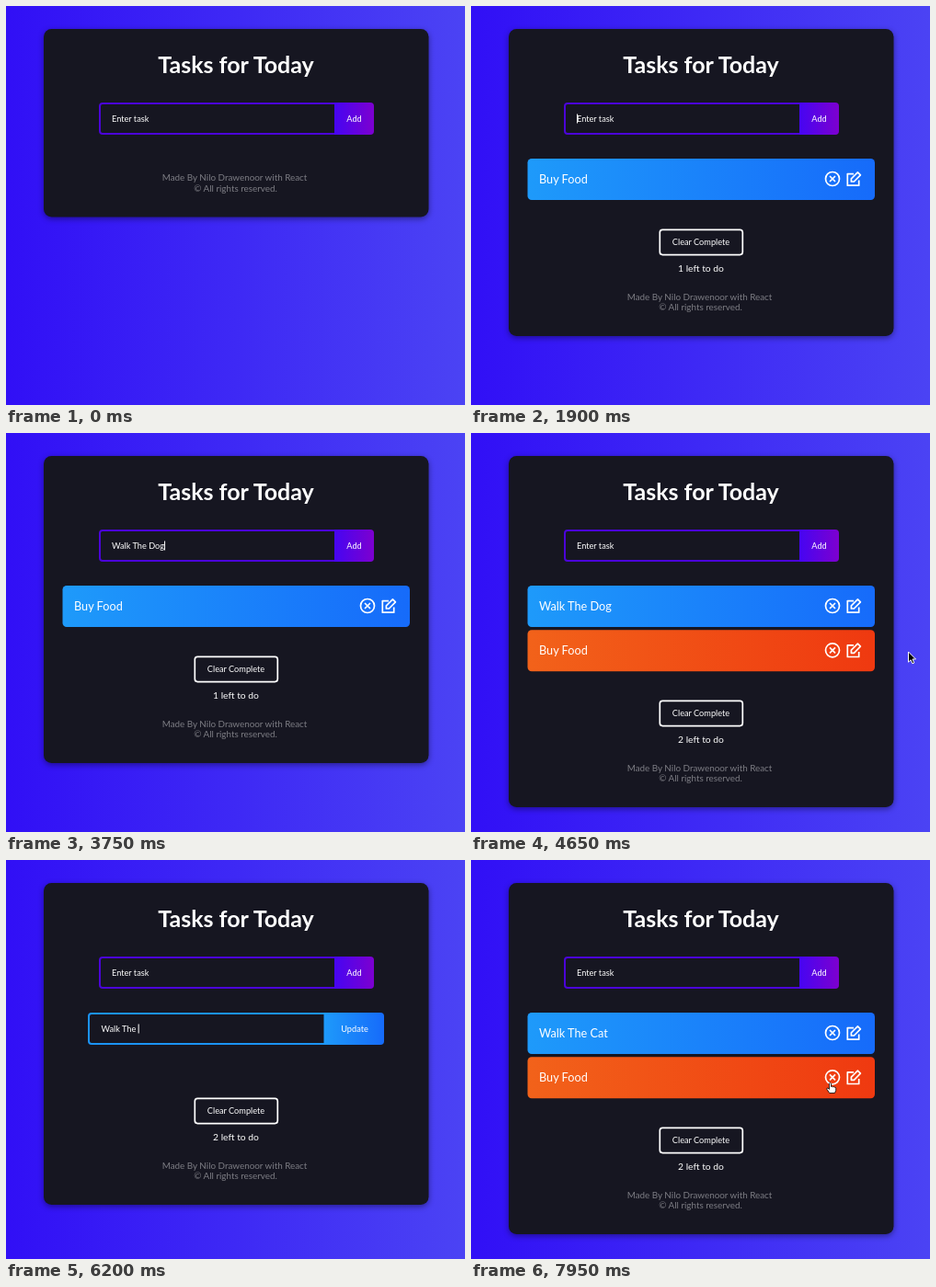
These frames come from a looping animation (499 by 434 pixels, 8 s). An HTML page:

```html
<!DOCTYPE html>
<html lang="en">
<head>
<meta charset="utf-8">
<title>Tasks for Today</title>
<style>
  html, body { margin: 0; width: 100%; height: 100%; overflow: hidden; background: #3a22f5; }
  svg { display: block; width: 100%; height: 100%; }
  text { font: 9.2px Lato, "Open Sans", sans-serif; fill: #fff; white-space: pre; }
  .mid { text-anchor: middle; }
  .title { font-size: 25px; font-weight: 700; }
  .task { font-size: 12.7px; }
  .left { font-size: 10.3px; }
  .foot { font-size: 9.85px; fill: #7d7d84; }
  .card { fill: #161621; filter: drop-shadow(0 2px 3px rgba(0, 0, 0, .42)); }
  .line { fill: none; stroke: #fff; stroke-width: 1.7; stroke-linejoin: round; }
  .caret { fill: #fff; }
</style>
</head>
<body>
<svg viewBox="0 0 499 434">
  <defs>
    <linearGradient id="page"><stop stop-color="#310ff6"/><stop offset="1" stop-color="#4b43f4"/></linearGradient>
    <linearGradient id="violet"><stop stop-color="#4605f2"/><stop offset="1" stop-color="#7d00cf"/></linearGradient>
    <linearGradient id="blue"><stop stop-color="#1e9afa"/><stop offset="1" stop-color="#166bfa"/></linearGradient>
    <linearGradient id="orange"><stop stop-color="#f2621a"/><stop offset="1" stop-color="#ef3910"/></linearGradient>
    <g id="icons" class="line">
      <circle cx="393" cy="22" r="7.5"/>
      <path d="M390 19l6 6m0-6l-6 6"/>
      <path d="M416 16.6h-6.7v12.6h12.4v-5.6M413.4 25v-3.2l7-7 3 3-7 7.2z"/>
    </g>
  </defs>

  <rect width="499" height="434" fill="url(#page)"/>
  <rect id="card" class="card" x="41" y="25" width="418.5" rx="8.5"/>
  <text class="title mid" x="250" y="73.3">Tasks for Today</text>

  <g id="addForm" transform="translate(101 105)">
    <path d="M257 1H4a3 3 0 0 0-3 3v27a3 3 0 0 0 3 3h253" fill="none" stroke="#4b04d9" stroke-width="2"/>
    <path d="M256 0h39a4 4 0 0 1 4 4v27a4 4 0 0 1-4 4h-39z" fill="url(#violet)"/>
    <text class="value" x="14" y="20.6"></text>
    <rect class="caret" y="12.5" width="1" height="10"/>
    <text class="mid" x="277.5" y="20.6">Add</text>
  </g>

  <g id="editForm" transform="translate(89 166)">
    <path d="M257 1H4a3 3 0 0 0-3 3v27a3 3 0 0 0 3 3h253" fill="none" stroke="#1b93f7" stroke-width="2"/>
    <path d="M256.500 0h61.500a4 4 0 0 1 4 4v27a4 4 0 0 1-4 4h-61.500z" fill="url(#blue)"/>
    <text class="value" x="14.500" y="20.6"></text>
    <rect class="caret" y="12.5" width="1" height="10"/>
    <text class="mid" x="290" y="20.6">Update</text>
  </g>

  <g id="row0" transform="translate(0 166)">
    <rect x="61.5" width="377.5" height="45" rx="4.500" fill="url(#blue)"/>
    <text class="task" x="74" y="26.7"></text>
    <use href="#icons"/>
  </g>
  <g id="row1" transform="translate(0 214.3)">
    <rect x="61.5" width="377.5" height="45" rx="4.500" fill="url(#orange)"/>
    <text class="task" x="74" y="26.7">Buy Food</text>
    <use href="#icons"/>
  </g>

  <g id="bottom">
    <g id="summary">
      <rect class="line" x="205.300" y="-115.700" width="90" height="27.300" rx="3"/>
      <text class="mid" x="250" y="-98.900">Clear Complete</text>
      <text id="count" class="left mid" x="250" y="-70.500"></text>
    </g>
    <text class="foot mid" x="248.5" y="-39.2">Made By Nilo Drawenoor with React</text>
    <text class="foot mid" x="249.5" y="-28">© All rights reserved.</text>
  </g>

  <g id="pointer" stroke-linejoin="round">
    <path id="arrow" d="M0 0V11.200L2.600 8.800 4.400 12.800 6.300 12 4.500 8H8z" fill="#000" stroke="#fff"/>
    <path id="hand" d="M-1 1Q0-.6 1 1V4.500Q2 3.700 2.800 4.800 3.900 4 4.600 5.200 6 4.700 6.200 6.200V8.500L5 11.500H-.8L-3.600 7.300Q-4 5.800-2.500 6L-1 7.400z" fill="#fff" stroke="#000" stroke-width=".8"/>
  </g>
</svg>
<script>
const LOOP = 8000;
const ADD_FIRST = 1450, ADD_SECOND = 4100, EDIT = 5350, UPDATE = 7000;
const $ = id => document.getElementById(id);
const show = (el, on) => el.setAttribute('visibility', on ? 'visible' : 'hidden');
const clamp = (v, lo, hi) => Math.min(hi, Math.max(lo, v));

// Number of key presses made by time t, and the time of the latest one.
function keys(t, start, step, total) {
  const count = clamp(Math.floor((t - start) / step) + 1, 0, total);
  return { count, last: count ? start + (count - 1) * step : 0 };
}

function typed(t, text, start, step, focusTime) {
  const k = keys(t, start, step, text.length);
  return { text: text.slice(0, k.count), last: Math.max(k.last, focusTime) };
}

function addValue(t) {
  if (t < ADD_FIRST) return typed(t, 'Buy Food', 410, 115, 50);
  if (t < ADD_SECOND) return typed(t, 'Walk The Dog', 2250, 125, ADD_FIRST);
  return { text: '', last: t < UPDATE ? ADD_SECOND : UPDATE };
}

function editValue(t) {
  const erased = keys(t, 5850, 140, 3);
  const added = keys(t, 6450, 110, 3);
  return {
    text: 'Walk The ' + (added.count ? 'Cat'.slice(0, added.count) : 'Dog'.slice(0, 3 - erased.count)),
    last: Math.max(EDIT, erased.last, added.last)
  };
}

function drawInput(form, { text, last }, t, focused) {
  const value = form.querySelector('.value');
  const caret = form.querySelector('.caret');
  value.textContent = text.replace(/ /g, '\u00a0');
  const width = text ? value.getComputedTextLength() : 0;
  caret.setAttribute('x', +value.getAttribute('x') + width);
  if (!text) value.textContent = 'Enter task';
  show(caret, focused && t >= last && (t - last) % 1000 < 500);
}

function glide(t, start, end, from, to) {
  const p = clamp((t - start) / (end - start), 0, 1);
  const e = p * p * (3 - 2 * p);
  return from.map((v, i) => v + (to[i] - v) * e);
}

function drawPointer(t) {
  const firstTrip = t >= 4550 && t < 5450;
  const secondTrip = t >= 7350;
  show($('arrow'), false);
  show($('hand'), false);
  if (!firstTrip && !secondTrip) return;
  const [x, y] = firstTrip
    ? glide(t, 4650, 5200, [475.5, 238], [416, 188])
    : glide(t, 7350, 7850, [416, 190], [390.5, 242]);
  const overIcon = [393, 416].some(ix => [188, 236.5].some(iy => Math.hypot(x - ix, y - iy) < 9));
  $('pointer').setAttribute('transform', `translate(${x} ${y})`);
  show($(overIcon ? 'hand' : 'arrow'), true);
}

function render(t) {
  const editing = t >= EDIT && t < UPDATE;
  const tasks = t < ADD_FIRST ? 0 : t < ADD_SECOND ? 1 : 2;
  const bottom = editing ? 375 : [229.5, 359, 407][tasks];

  $('card').setAttribute('height', bottom - 25);
  $('bottom').setAttribute('transform', `translate(0 ${bottom})`);
  show($('summary'), tasks > 0);
  $('count').textContent = `${tasks} left to do`;

  $('row0').querySelector('text').textContent =
    tasks < 2 ? 'Buy Food' : t < UPDATE ? 'Walk The Dog' : 'Walk The Cat';
  show($('row0'), tasks > 0 && !editing);
  show($('row1'), tasks > 1 && !editing);
  show($('editForm'), editing);

  drawInput($('addForm'), addValue(t), t, !editing);
  drawInput($('editForm'), editValue(t), t, editing);
  drawPointer(t);
}

const began = performance.now();
function tick() {
  render((performance.now() - began) % LOOP);
  requestAnimationFrame(tick);
}
tick();
</script>
</body>
</html>
```
